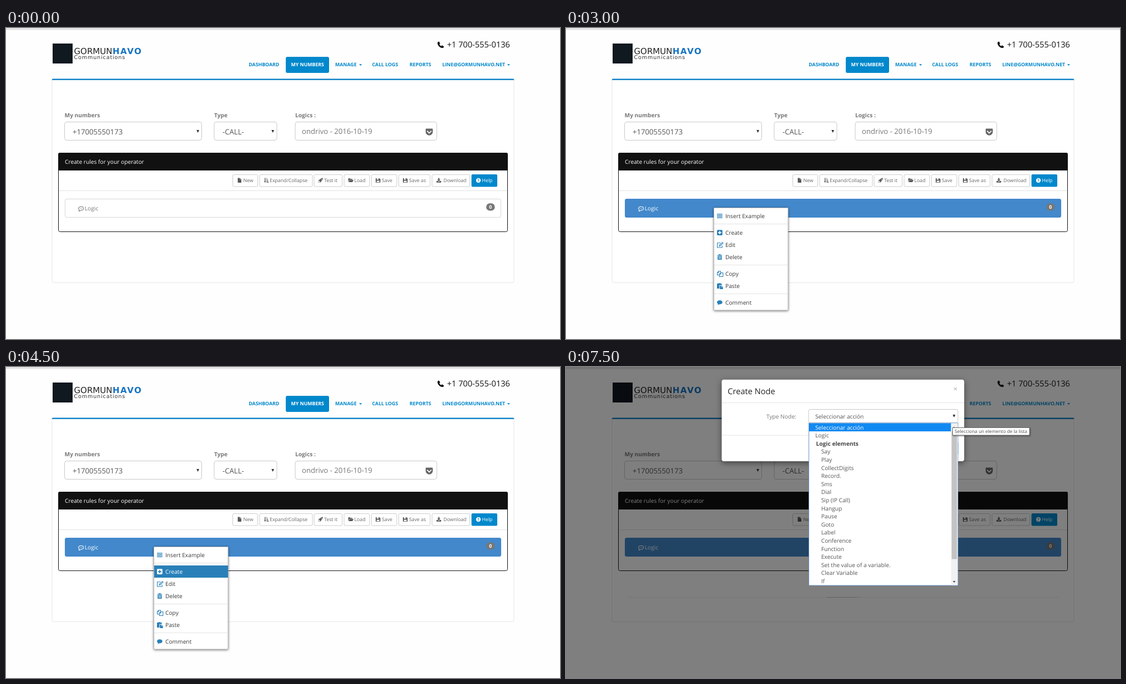
Write an HTML page that moves like this. It is 998 by 561 pixels and loops after 8 s.

```html
<!DOCTYPE html>
<html lang="en">
<head>
<meta charset="utf-8">
<title>Call logic editor</title>
<style>
html, body { margin: 0; width: 100%; height: 100%; overflow: hidden; background: #fefefe; }
svg { display: block; width: 998px; height: 561px; font-family: "Open Sans", sans-serif; text-rendering: geometricPrecision; }
text { white-space: pre; }
#menu .card { filter: drop-shadow(0 1.5px 2px rgba(0,0,0,.55)); }
#modal .card { filter: drop-shadow(0 3.6px 5.5px rgba(0,0,0,.5)); }
#list .tip { filter: drop-shadow(1.5px 1.5px 1px rgba(0,0,0,.5)); }
</style>
</head>
<body>
<svg id="stage" viewBox="0 0 998 561"></svg>
<script>
const LOOP = 8000;
const BLUE = '#0088cc', MENU_BLUE = '#2980b9', GRAY = '#777', DARK = '#555';
// Type sizes: the page is laid out 1366 wide and shown at 998
const [S12, S14, S18, S20] = [12, 14, 18, 20].map(n => +(n * 998 / 1366).toFixed(2));

// Icons on a 10 x 10 grid; "o" icons are outlines
const icons = {
  file: 'M1.2 0H5.4V3.4H8.8V10H1.2ZM6.1 0L8.8 2.7H6.1Z',
  sort: 'M1.2 0H2.8V7.2H4.2L2 10L-.2 7.2H1.2ZM5 .3H6.6V1.8H5ZM5 3H7.6V4.5H5ZM5 5.7H8.8V7.2H5ZM5 8.4H10V9.9H5Z',
  rocket: 'M10 0C7 0 5 1.5 3.6 3.6L1.4 3.9L0 6.3L2.2 6L4 7.8L3.7 10L6.1 8.6L6.4 6.4C8.5 5 10 3 10 0ZM7.2 2A.8 .8 0 1 0 7.21 2ZM1 7.2L2.8 9L.2 9.8Z',
  folder: 'M0 1H4L5 2.2H9V3.8H3L0 7.8ZM3.3 4.6H11.5L9 9H.4Z',
  floppy: 'M0 .5H8L10 2.5V9.8H0ZM2.2 .5V3.8H7V.5ZM2 6V9H8V6ZM5 1.1H6.4V3.2H5Z',
  download: 'M3.8 0H6.2V3.5H8.6L5 7L1.4 3.5H3.8ZM0 6.4H3L5 8.3L7 6.4H10V9.8H0Z',
  bars: 'M0 1H10V2.6H0ZM0 4.2H10V5.8H0ZM0 7.4H10V9H0Z',
  plus: 'M1.5 0H8.5Q10 0 10 1.5V8.5Q10 10 8.5 10H1.5Q0 10 0 8.5V1.5Q0 0 1.5 0ZM4.1 2V4.1H2V5.9H4.1V8H5.9V5.9H8V4.1H5.9V2Z',
  trash: 'M3.3 0H6.7L7.2 1.2H9.5V2.3H.5V1.2H2.8ZM1.2 3H8.8V10H1.2ZM3 4V8.6H3.7V4ZM4.7 4V8.6H5.4V4ZM6.4 4V8.6H7.1V4Z',
  paste: 'M0 .8H2.4V0H5.6V.8H8V3.3H4V9H0ZM4.8 4.1H7.3V6.5H10V10H4.8ZM8 4.1L10 5.8H8Z',
  comment: 'M5 1C8 1 10 2.6 10 4.7C10 6.8 8 8.4 5 8.4L4 8.3C3 9.2 2 9.5 .8 9.6C1.5 9 1.9 8.4 2 7.6C.8 7 0 6 0 4.7C0 2.6 2 1 5 1Z',
  phone: 'M2.5 0L4.2 3L2.9 4.2C3.5 5.5 4.5 6.5 5.8 7.1L7 5.8L10 7.5C10 9.2 9 10 7.5 10C3.5 9.4 .6 6.5 0 2.5C0 1 .8 0 2.5 0Z',
  badge: 'M1 0H9Q10 0 10 1V4.5A5 5 0 0 1 0 4.5V1Q0 0 1 0ZM2.3 2.8L1.5 3.8L5 7.2L8.5 3.8L7.7 2.8L5 5.3Z',
  oedit: 'M8.6 6V9H.5V1.5H6M3.8 6.7L4.2 5L9 .4L10.3 1.7L5.5 6.3Z',
  ocopy: 'M6 2.6V.5H2.8L.5 2.8V7H4M2.8 .5V2.8H.5M6.3 3H10V9.5H4V5.3ZM6.3 3V5.3H4',
  ochat: 'M5 1.3C7.9 1.3 9.5 2.9 9.5 4.6C9.5 6.4 7.6 7.9 4.4 7.8C3.4 8.7 2.4 9.1 1.3 9.2L2.2 7.2C1 6.6 .5 5.6 .5 4.6C.5 2.9 2.1 1.3 5 1.3ZM2.6 4.6H3.6M4.5 4.6H5.5M6.4 4.6H7.4'
};

const text = (x, y, s, size = S14, fill = GRAY, extra = '') =>
  `<text x="${x}" y="${y}" font-size="${size}" fill="${fill}" ${extra}>${s}</text>`;
const bold = (x, y, s, size, fill) => text(x, y, s, size, fill, 'font-weight="700"');
const box = (x, y, w, h, fill, stroke = 'none', r = 0, extra = '') =>
  `<rect x="${x}" y="${y}" width="${w}" height="${h}" rx="${r}" fill="${fill}" stroke="${stroke}" ${extra}/>`;
const line = (x1, x2, y, color) => box(x1, y, x2 - x1, 1, color);
const arrow = (x, y, w, h, fill) => `<path d="M${x} ${y}h${w}l${-w / 2} ${h}z" fill="${fill}"/>`;
const group = (id, body) => `<g id="${id}">${body}</g>`;
const icon = (name, x, y, size, color) => {
  const paint = name[0] === 'o' ? `fill="none" stroke="${color}" stroke-width="1"` : `fill="${color}" fill-rule="evenodd"`;
  return `<path d="${icons[name]}" transform="translate(${x} ${y}) scale(${size / 10})" ${paint}/>`;
};

const header = () =>
  box(0, 0, 998, 3.6, '#e4e4e4') +
  box(84, 28, 36, 36, '#101820') +
  text(122.5, 47, 'GORMUN', 15, '#222', 'font-family="DejaVu Sans, sans-serif"') +
  text(192, 47, 'HAVO', 15, '#1672c4', 'font-family="DejaVu Sans, sans-serif" font-weight="700" letter-spacing="1.5"') +
  text(122.5, 56, 'Communications', 9.6, '#333', 'font-family="DejaVu Sans, sans-serif" letter-spacing=".85"') +
  icon('phone', 777.3, 24.5, 11.5, '#111') +
  text(794.5, 35, '+1 700-555-0136', S20, '#111') +
  box(504, 52, 78, 29, BLUE, 'none', 3) +
  [[437.3, 'DASHBOARD'], [513.5, 'MY NUMBERS', '#fff'], [593, 'MANAGE'], [659.5, 'CALL LOGS'],
   [727, 'REPORTS'], [786, 'LINE@GORMUNHAVO.NET']]
    .map(([x, s, fill = BLUE]) => bold(x, 69.3, s, S12, fill)).join('') +
  arrow(636, 65.3, 5.4, 2.8, BLUE) + arrow(902.7, 65.3, 5.4, 2.8, BLUE);

const field = (label, x, w, value, textX, y, fill) =>
  bold(x, 161.3, label, S14, GRAY) + box(x, 169.5, w, 33, '#fff', '#c8c8c8', 4) + text(textX, y, value, S18, fill);

const button = ([x, w, name, iconX, textX, label]) =>
  box(x, 264.5, w, 21.5, '#fff', '#ccc', 2) + icon(name, iconX, 270.5, 8.4, DARK) + text(textX, 278.4, label, S12, '#666');

const tools = [
  [408.5, 45, 'file', 416.5, 427.5, 'New'],
  [457, 95, 'sort', 465, 475, 'Expand/Collapse'],
  [555, 50.5, 'rocket', 562.5, 573, 'Test it'],
  [609, 46, 'folder', 616.5, 627.5, 'Load'],
  [658.5, 45.5, 'floppy', 666, 677, 'Save'],
  [707.5, 56.5, 'floppy', 715, 726, 'Save as'],
  [767.5, 68, 'download', 775.5, 788, 'Download']
];

const logicRow = (fill, stroke, ink) =>
  box(106.5, 308.5, 785, 33, fill, stroke, 2.5) + icon('ochat', 130, 321, 10.3, ink) + text(141.8, 328.6, 'Logic', S14, ink) +
  box(865, 316.3, 15.6, 13.2, GRAY, 'none', 6.6) + bold(870.2, 326.2, '0', S12, '#fff');

const page = () => header() +
  box(83, 92.5, 832, 367, '#fff', '#e6e6e6', 3) +
  '<path d="M82.5 94Q82.5 91.4 85 91.4H913Q915.5 91.4 915.5 94Z" fill="#1585c9"/>' +
  field('My numbers', 105.5, 247, '+17005550173', 120, 192.2, DARK) + arrow(343.2, 184, 4.8, 5, '#333') +
  field('Type', 375, 113, '-CALL-', 390, 192.2, DARK) + arrow(478.2, 184, 4.8, 5, '#333') +
  field('Logics :', 521, 255, 'ondrivo - 2016-10-19', 533, 190.8, GRAY) + icon('badge', 756, 181.5, 12.8, '#666') +
  box(94.5, 225.5, 809, 142, '#fff', '#111', 3) +
  '<path d="M94 257V228Q94 225 97 225H901Q904 225 904 228V257Z" fill="#111"/>' +
  text(106, 244.6, 'Create rules for your operator', S14, '#fff') +
  tools.map(button).join('') +
  box(838.5, 264, 46.5, 22.5, BLUE, 'none', 2) + '<circle cx="851" cy="275" r="4.2" fill="#fff"/>' +
  bold(849.1, 277.9, '?', 7.5, BLUE) + text(857.5, 278.4, 'Help', S12, '#fff') +
  line(95, 903, 293, '#e2e2e2') + logicRow('#fff', '#d8d8d8', GRAY);

const menuItems = [
  ['bars', 'Insert Example', 339], ['plus', 'Create', 369], ['oedit', 'Edit', 391], ['trash', 'Delete', 413],
  ['ocopy', 'Copy', 443], ['paste', 'Paste', 465], ['comment', 'Comment', 495]
];
const menuItem = ([name, label, y], iconInk = MENU_BLUE, ink = '#3a3a3a') =>
  icon(name, 272, y - 4.8, name[0] === 'o' || name === 'paste' ? 10.8 : 9.8, iconInk) + text(287, y + 3.6, label, S14, ink);
const menu = () =>
  box(266.5, 324.5, 133.5, 184.5, '#fff', '#bbb', 1, 'class="card"') +
  [353, 427, 479].map(y => line(267, 399.5, y, '#e4e4e4')).join('') + menuItems.map(i => menuItem(i)).join('');
const hover = () => box(267, 358, 133, 22, MENU_BLUE) + menuItem(menuItems[1], '#fff', '#fff');

const modal = () =>
  box(280.5, 22.7, 436.8, 147.3, '#fff', 'none', 4, 'class="card"') +
  text(291.3, 48.8, 'Create Node', S20, '#222') + bold(697.8, 44.3, '×', 13, '#c4c4c4') +
  line(281, 717, 64, '#e5e5e5') + line(281, 717, 122.6, '#e5e5e5') +
  text(361, 92.7, 'Type Node:') + box(437, 76.5, 269, 24, '#fff', '#c8c8c8', 3) +
  text(449, 92.6, 'Seleccionar acción', S14, DARK) + arrow(696.7, 86, 4.8, 5, '#333') +
  box(576.5, 134.5, 44, 24.5, '#fff', '#ccc', 3) + text(585.5, 150.6, 'Close', S14, '#666') +
  box(627.5, 134, 79, 25.3, BLUE, 'none', 3) + text(636.8, 150.6, 'Create Node', S14, '#fff');

const options = ['Seleccionar acción', 'Logic', 'Logic elements', 'Say', 'Play', 'CollectDigits', 'Record.', 'Sms', 'Dial',
  'Sip (IP Call)', 'Hangup', 'Pause', 'Goto', 'Label', 'Conference', 'Function', 'Execute',
  'Set the value of a variable.', 'Clear Variable', 'If'];
const option = (s, i) => {
  const y = 112.5 + 14.6 * i;
  if (i === 2) return bold(450.5, y, s, S14, '#444');
  return text(i < 2 ? 449 : 459.7, y, s, S14, i ? DARK : '#fff');
};
const list = () =>
  box(437.5, 101, 268.5, 293, '#fff', '#6c93c8') + box(438, 101.5, 255.5, 14.6, '#1089f2') +
  box(694, 101.5, 11.5, 292, '#f1f1f1') + box(694.7, 116, 9.6, 230.5, '#c3c3c3') +
  arrow(701.6, 110.2, -5, -3, '#999') + arrow(696.8, 386, 5, 3, '#444') +
  options.map(option).join('') +
  box(696.5, 109.5, 138.5, 13.5, '#fff', '#707070', 0, 'class="tip"') +
  text(700.3, 119.4, 'Selecciona un elemento de la lista', 8.3, '#4c4c4c');

document.getElementById('stage').innerHTML = page() +
  group('selected', logicRow('#4288cb', '#4288cb', '#fff')) +
  group('wideRule', line(268, 727, 415, '#e4e4e4') + line(449, 547, 415, '#bdbdbd') + line(547, 552, 415, '#d4d4d4') + line(730, 733, 415, '#eee')) +
  group('menu', menu()) + group('hover', hover()) +
  group('shade', box(0, 0, 998, 561, '#000', 'none', 0, 'opacity=".5"') +
    line(110, 889, 415, '#777') + line(470, 525, 415, '#606060') + line(525, 532, 415, '#707070')) +
  group('modal', modal()) + group('list', list());

const show = (id, from, to = LOOP) => document.getElementById(id).animate(
  [[0, 0], [from, 1], [to, 0], [LOOP, 0]].map(([time, opacity]) => ({ offset: time / LOOP, opacity, easing: 'steps(1, end)' })),
  { duration: LOOP, iterations: Infinity });

[['selected', 1500], ['wideRule', 0, 6000], ['menu', 3000, 6000], ['hover', 4500, 6000],
 ['shade', 6000], ['modal', 6000], ['list', 7500]].forEach(step => show(...step));
</script>
</body>
</html>
```
